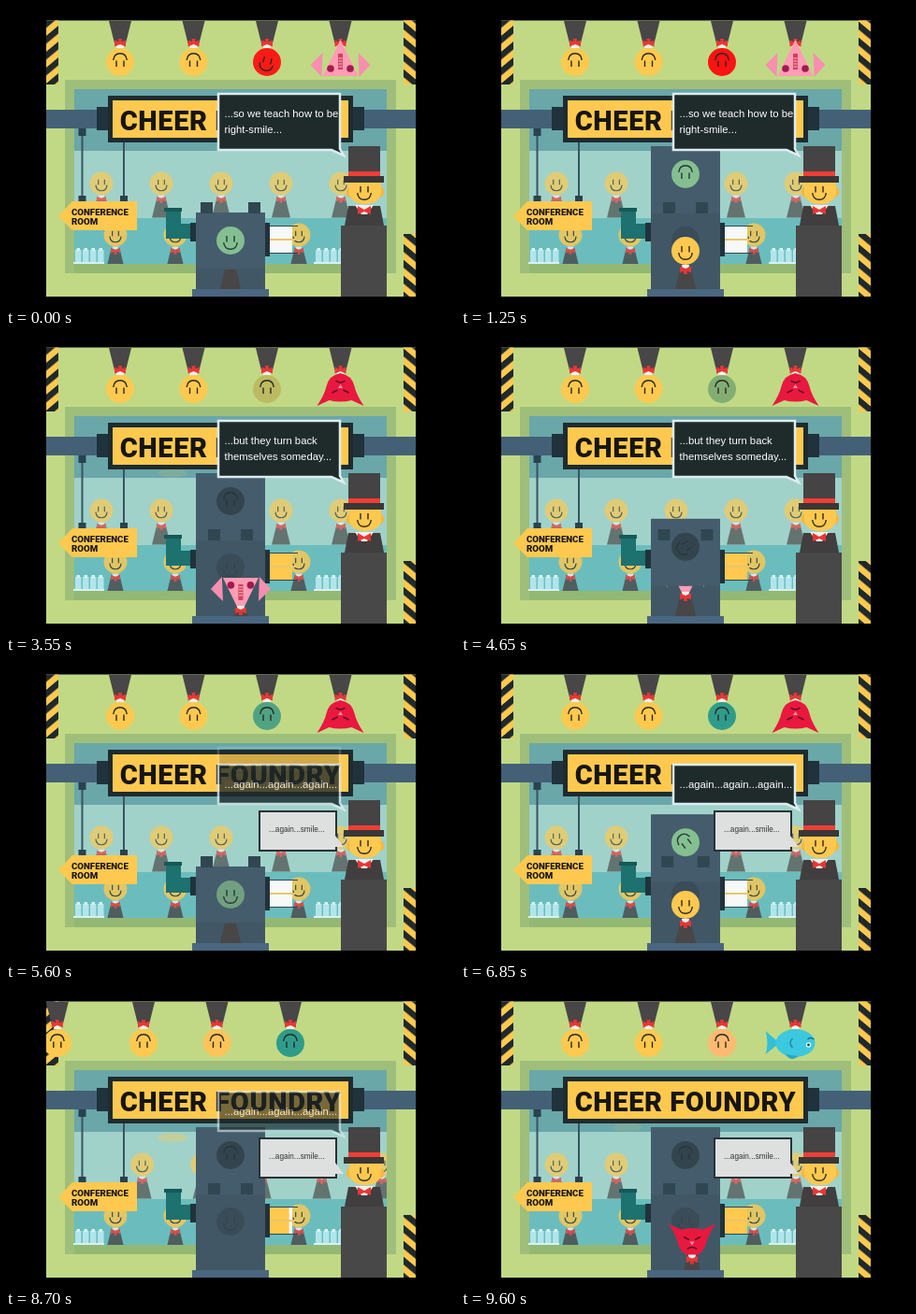
Animation of 480x320 px, one loop 9.65 s. Source, as an HTML page:

```html
<!DOCTYPE html>
<html>
<head>
<meta charset="utf-8">
<style>
html, body { margin: 0; width: 100%; height: 100%; overflow: hidden; background: #000; }
svg { display: block; width: 480px; height: 320px; }
.sign { font-family: Roboto, sans-serif; font-weight: 900; fill: #171512; }
.talk { font-family: "Liberation Sans", Arial, sans-serif; }
</style>
</head>
<body>
<svg viewBox="0 0 480 320" xmlns="http://www.w3.org/2000/svg">
  <defs>
    <clipPath id="stage"><rect x="43" y="15.5" width="395" height="295.5"/></clipPath>
    <clipPath id="glass"><rect x="73" y="89" width="334" height="138"/></clipPath>
    <clipPath id="floor"><rect x="73" y="227" width="334" height="49"/></clipPath>
    <clipPath id="slot"><rect x="190" y="222" width="110" height="81"/></clipPath>
    <clipPath id="shaft"><rect x="203" y="140" width="74" height="141"/></clipPath>
    <pattern id="up" width="20" height="17" patternUnits="userSpaceOnUse" patternTransform="skewY(-40)">
      <rect width="20" height="17" fill="#ffc94f"/><rect width="20" height="8.5" fill="#20292c"/>
    </pattern>
    <pattern id="down" width="20" height="17" patternUnits="userSpaceOnUse" patternTransform="skewY(40)">
      <rect width="20" height="17" fill="#ffc94f"/><rect width="20" height="8.5" fill="#20292c"/>
    </pattern>
  </defs>
  <rect width="480" height="320"/>
  <g clip-path="url(#stage)">
    <g id="room"></g>
    <g id="workers"></g>
    <g id="machine"></g>
    <g id="front"></g>
    <g id="line"></g>
    <g id="bubbles"></g>
  </g>
</svg>
<script>
const LOOP = 9650, CYCLE = 6;
const YELLOW = '#ffc94f', SUIT = '#484646', RED = '#e93636', STEEL = '#304651';
const $ = id => document.getElementById(id);
const clamp = v => Math.max(0, Math.min(1, v));
const ramp = (t, a, b) => clamp((t - a) / (b - a));
const ease = u => u * u * (3 - 2 * u);
const glide = (t, a, b) => ease(ramp(t, a, b));
const rect = (x, y, w, h, fill, more = '') =>
  `<rect x="${x}" y="${y}" width="${w}" height="${h}" fill="${fill}" ${more}/>`;
const path = (d, fill, more = '') => `<path d="${d}" fill="${fill}" ${more}/>`;
const dot = (x, y, r, fill) => `<circle cx="${x}" cy="${y}" r="${r}" fill="${fill}"/>`;
const group = (x, y, rot, art, size = 1) =>
  `<g transform="translate(${x} ${y}) rotate(${rot}) scale(${size})">${art}</g>`;

function mix(a, b, u) {
  const ch = (c, i) => parseInt(c.slice(i, i + 2), 16);
  return 'rgb(' + [1, 3, 5].map(i => Math.round(ch(a, i) + (ch(b, i) - ch(a, i)) * u)).join() + ')';
}

// Heads and creatures are drawn upright around their own centre.
const face = (ink = '#2b2924') =>
  path('M-4 -5V1.5M4 -5V1.5M-7.3 2Q-6.5 9.3 0 9.3T7.3 2', 'none', `stroke="${ink}" stroke-width="1.4"`);
const bow = path('M-4 15H4L3 20H-3Z', '#f5f0ea') +
  path('M-6 16.5L0 19L6 16.5V23.5L0 21L-6 23.5Z', RED) + path('M-1.5 20H1.5L2 25H-2Z', RED);
const body = path('M-6 20H6L12 44H-12Z', SUIT);
const ball = (col, spin = 0) => dot(0, 0, 15, col) + group(0, 0, spin, face());
const person = body + bow + ball(YELLOW);

const creatures = [
  { tone: '#ff9db5', art:
    path('M-20 -16L-32 -3L-19 10ZM20 -16L32 -3L19 10Z', '#f88fb0') +
    path('M-19 -15H19L0 24Z', '#ff9db5') +
    dot(-10.5, -7, 3.8, '#a3194d') + dot(10.5, -7, 3.8, '#a3194d') +
    rect(-2.5, -8, 5, 17, '#d0405a') +
    path('M-2 -5H2M-2 -2H2M-2 1H2M-2 4H2', 'none', 'stroke="#ffc0cf"') },
  { tone: '#ff1212', art:
    path('M-25 -18L-12 -12Q0 -15 12 -12L25 -18Q17 -6 15 3Q12 15 0 17Q-12 15 -15 3Q-17 -6 -25 -18Z', '#e9183f') +
    path('M-9 -4L-3 -1M9 -4L3 -1M-5 9Q0 5 5 9', 'none', 'stroke="#5d1024" stroke-width="1.5"') +
    path('M-2.5 1H2.5L0 5Z', '#ff8fa0') },
  { tone: '#2f9c8b', art:
    path('M17 0L32 -12Q28 0 32 13Z', '#33bfd9') +
    '<ellipse rx="21" ry="15" fill="#3cc8df"/>' +
    path('M-3 -14Q4 -21 11 -12Z', '#27a7c4') +
    path('M3 -5Q8 0 3 5', 'none', 'stroke="#1d8ca8" stroke-width="1.5"') +
    dot(-14, -2, 2.7, '#eafcff') + dot(-14, -2, 1.4, '#174453') +
    path('M-20 4Q-16 7 -13 4', 'none', 'stroke="#176f88" stroke-width="1.3"') }
];
const kind = i => creatures[i % 3];

function drawRoom() {
  const bottles = x => [0, 8, 16, 24].map(d =>
    rect(x + d, 261, 6.5, 13, '#b2e5eb') + rect(x + d + 1.5, 259, 3.5, 3, '#d7f2f2')).join('');
  $('room').innerHTML =
    rect(43, 15, 395, 296, '#c1d985') + rect(63, 79, 354, 207, '#9fbe7a') +
    rect(73, 89, 334, 188, '#69a7a9') + rect(73, 155, 334, 72, '#a0d2ca') +
    rect(73, 227, 334, 49, '#6bbdbd') + rect(73, 276, 334, 10, '#93b873') +
    bottles(74) + bottles(331) + rect(72, 274, 33, 2, '#d7f2f2') + rect(329, 274, 33, 2, '#d7f2f2') +
    rect(43, 15, 13, 69, 'url(#up)') + rect(425, 15, 13, 69, 'url(#down)') +
    rect(425, 244, 13, 67, 'url(#down)');
}

function drawFront() {
  const rope = x => rect(x - 1, 138, 2, 70, '#3b5360') +
    rect(x - 4, 131, 8, 8, '#29424f') + rect(x - 4, 203, 8, 8, '#29424f');
  $('front').innerHTML =
    rope(81.5) + rope(126) +
    rect(43, 111, 395, 20, '#436076') + rect(97, 108, 13, 25, '#20323b') + rect(370, 108, 13, 25, '#20323b') +
    rect(109, 96, 262, 50, '#1f2b30') + rect(114, 101, 252, 40, YELLOW) +
    '<text class="sign" x="240" y="133" font-size="29" text-anchor="middle" letter-spacing=".6">CHEER FOUNDRY</text>' +
    path('M56 225L71 209H140V240H71Z', YELLOW) +
    '<text class="sign" font-size="9.7"><tspan x="70" y="224">CONFERENCE</tspan><tspan x="70" y="233.5">ROOM</tspan></text>' +
    rect(358, 235, 49, 76, '#484848') + path('M366 214H400L404 235H362Z', '#403e3e') +
    rect(364, 193, 40, 12, '#f4b840', 'rx="5"') +
    path('M367 186H401V201Q398 212 384 212Q370 212 367 201Z', YELLOW) +
    group(383, 198, 0, face()) +
    path('M373 213H393L386 223H380Z', '#f5f0ea') + path('M376 214L383 218L390 214V223L383 220L376 223Z', RED) +
    rect(366, 150, 34, 30, '#454343') + rect(366, 177, 34, 7, '#ef3e35') + rect(361, 182, 43, 7, '#393737');
}

function drawWorkers(p) {
  const leave = glide(p, 1.4, 1.85), step = glide(p, 2.4, 3.2);
  let s = '<g clip-path="url(#glass)" opacity=".68">';
  for (let i = 0; i < 6; i++) {
    if (i === 0 && leave === 1) continue;
    const y = i === 0 ? 190 - 85 * leave : 190;
    s += group(102 + 64 * (i - step), y, 0, person, .83);
  }
  s += '</g><g clip-path="url(#floor)" opacity=".8">';
  for (const x of [117, 181, 313]) s += group(x, 245, 0, person, .83);
  s += '</g>';
  const puff = ramp(p, 2, 2.2) * (1 - ramp(p, 2.3, 4));
  const y = 167 - 17 * ramp(p, 2.25, 3.55);
  s += `<ellipse cx="178" cy="${y}" rx="16" ry="4.5" fill="${YELLOW}" opacity="${puff * .5}"/>`;
  $('workers').innerHTML = s;
}

function drawMachine(t, p) {
  const n = Math.floor(t / CYCLE);
  const drop = p < 3 ? 1 - glide(p, .5, 1) : glide(p, 4.4, 4.8);
  const glow = p < 3 ? 1 - ramp(p, 1.5, 2.1) : ramp(p, 5, 5.8);
  const gold = p < 4 ? glide(p, 2.05, 2.9) : 1 - glide(p, 4.8, 5.3);

  const bar = y => rect(282, y, 24, 14, '#f7f9f8') + rect(282, y, 24 * gold, 14, YELLOW);
  let s =
    rect(171, 217, 16, 32, '#1d716f') + rect(171, 233, 29, 16, '#1d716f') + rect(169, 216, 19, 4, '#155957') +
    rect(197, 232, 6, 20, '#20323b') + rect(277, 232, 5, 36, '#20323b') +
    bar(235) + bar(251) + rect(282, 249, 30, 2, '#e8c66c') +
    rect(282, 235, 30, 1, STEEL) + rect(282, 264, 30, 1, STEEL) +
    rect(203, 221, 74, 82, '#415765') + dot(240, 251, 15, '#394c58') +
    group(240, 251, 0, face('#33454f')) + rect(199, 303, 82, 8, '#4a6780');

  let guest = '';
  if (p < 1.85) {
    guest = group(240, 262 + 62 * glide(p, 1.4, 1.8), 0, body + (drop < .9 ? bow : '') + ball(YELLOW));
  } else if (p > 3.3) {
    const u = ramp(p, 3.3, 3.8), k = (1 - u) * (1 - u);
    guest = group(240 + 44 * k, 262 + 60 * k, 0,
      body + (p > 5 ? ball(YELLOW) : kind(n).art + (drop < .9 ? bow : '')));
  }
  s += `<g clip-path="url(#slot)">${guest}</g>`;

  const press = rect(203, 150, 74, 72, '#455c6c') +
    dot(240, 180, 15, mix('#34444e', '#84bf90', glow)) +
    group(240, 180, 180 * (1 - drop), face('#29363c'));
  s += `<g clip-path="url(#shaft)">${group(0, 71 * drop, 0, press)}</g>`;
  const grip = 216 - 8 * drop;
  s += rect(grip, 210, 13, 12, STEEL) + rect(467 - grip, 210, 13, 12, STEEL);
  $('machine').innerHTML = s;
}

function drawLine(t) {
  const moved = glide(t, 2.4, 3.2) + glide(t, 8.4, 9.2);
  let s = '';
  for (let i = 0; i < 7; i++) {
    const slot = i - moved;
    if (slot < -.5 || slot > 4) continue;
    const x = 357.5 - 78.5 * slot - (slot > 3 ? 20 * (slot - 3) : 0);
    const lift = ramp(t, CYCLE * i + 1.4, CYCLE * i + 1.8);
    if (lift === 1) continue;
    const tint = ramp(t, CYCLE * (i - 2) + 2.3, CYCLE * (i - 2) + 6.2);
    const turn = clamp((.55 - slot) / .4);
    const start = CYCLE * (i - 1) - .4;
    const spin = 195 * glide(t, start, start + .4) + 165 * glide(t, start + .4, start + 1.1);
    let art = body + bow;
    if (turn < 1) art += `<g opacity="${1 - turn}">${ball(mix(YELLOW, kind(i).tone, tint), spin)}</g>`;
    if (turn > 0) art += `<g opacity="${turn}">${kind(i).art}</g>`;
    s += group(x, 60 - 85 * lift * lift, 180, art);
  }
  $('line').innerHTML = s;
}

function bubble(lines, top, alpha) {
  if (alpha <= 0) return '';
  const words = lines.map((w, i) => `<tspan x="233.5" y="${top + 25 + 17 * i}">${w}</tspan>`).join('');
  return `<g opacity="${alpha}">` +
    path(`M227 ${top}H357V153L361 160L348 154H227Z`, '#1f2a2b', 'stroke="#dcecee" stroke-width="2.5"') +
    `<text class="talk" font-size="11.3" fill="#fff">${words}</text></g>`;
}

function drawBubbles(t) {
  const show = (a, b, c, d) => ramp(t, a, b) * (1 - ramp(t, c, d));
  const reply = ramp(t, 5.2, 5.6);
  $('bubbles').innerHTML =
    bubble(['...so we teach how to be', 'right-smile...'], 94, 1 - ramp(t, 1.9, 2.35)) +
    bubble(['...but they turn back', 'themselves someday...'], 94, show(2.15, 2.6, 5.2, 5.7)) +
    bubble(['...again...again...again...'], 112, show(5.2, 5.75, 8.5, 9)) +
    `<g opacity="${reply}">` + rect(271, 162, 82, 42, '#dedfdf', 'stroke="#283237" stroke-width="2"') +
    path('M352 188L361 200H352Z', '#dedfdf') +
    '<text class="talk" x="281" y="184" font-size="8.2" fill="#333">...again...smile...</text></g>';
}

function render(ms) {
  const t = (ms % LOOP) / 1000, p = t % CYCLE;
  drawWorkers(p);
  drawMachine(t, p);
  drawLine(t);
  drawBubbles(t);
}

drawRoom();
drawFront();
const begin = performance.now();
function tick() {
  render(performance.now() - begin);
  requestAnimationFrame(tick);
}
tick();
</script>
</body>
</html>
```
